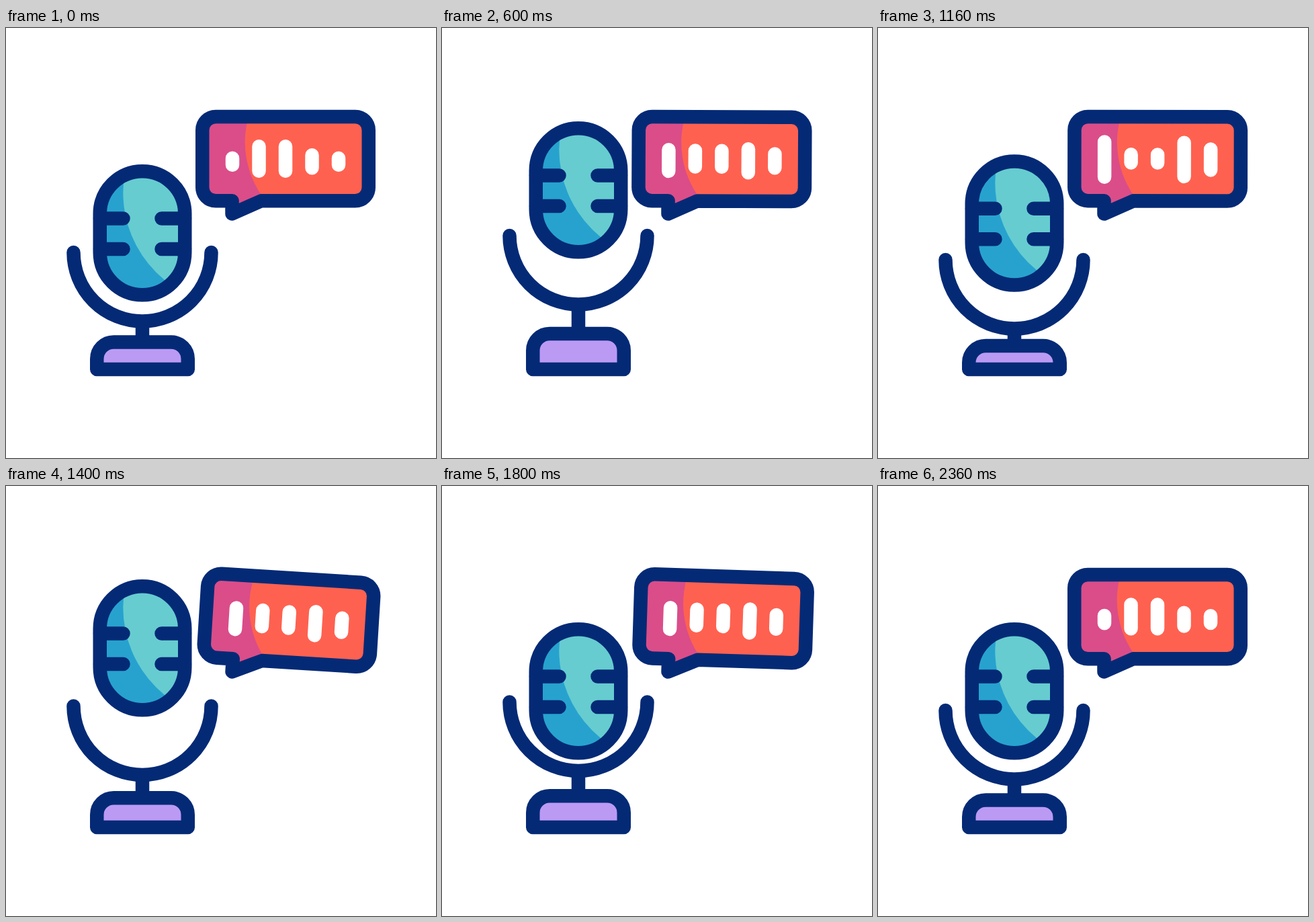
An HTML page for the animation above (2400 ms loop, 640 by 640 pixels).

```html
<!DOCTYPE html>
<html lang="en">
<head>
<meta charset="utf-8">
<title>Microphone and speech bubble</title>
<style>
  html, body { margin: 0; width: 100%; height: 100%; overflow: hidden; background: #fff; }
  svg { display: block; width: 100%; height: 100%; }
  .line, .voice { fill: none; stroke: #042a76; stroke-width: 20.5; stroke-linecap: round; stroke-linejoin: round; }
  .voice { stroke: #fff; }
</style>
</head>
<body>
<svg viewBox="0 0 640 640">
  <defs>
    <rect id="capsule" x="139.75" y="213.25" width="126.5" height="184" rx="63.25"/>
    <path id="shape" d="M312.25 132H519.75A20 20 0 0 1 539.75 152V237.25A20 20 0 0 1 519.75 257.25H380L336.5 276.5V257.25H312.25A20 20 0 0 1 292.25 237.25V152A20 20 0 0 1 312.25 132Z"/>
    <clipPath id="pill"><use href="#capsule"/></clipPath>
    <clipPath id="inside"><use href="#shape"/></clipPath>
  </defs>
  <path id="base" class="line" style="fill:#bb9af4"/>
  <path id="stem" class="line" style="stroke-linecap:butt"/>
  <path id="cradle" class="line" d="M100.5 334A102.5 102.5 0 0 0 305.5 334"/>
  <g id="head">
    <g clip-path="url(#pill)">
      <use href="#capsule" fill="#27a2ce"/>
      <circle cx="342.3" cy="245" r="168" fill="#66ccd0"/>
    </g>
    <path class="line" d="M140 283.5H174.5M140 329H174.5M266 283.5H231.5M266 329H231.5"/>
    <use href="#capsule" class="line"/>
  </g>
  <g id="bubble">
    <use href="#shape" fill="#da4d89"/>
    <g clip-path="url(#inside)">
      <path d="M363 125A140 140 0 0 0 384 254L400 270H550V125Z" fill="#ff6150"/>
    </g>
    <use href="#shape" class="line"/>
    <path id="voices" class="voice"/>
  </g>
</svg>
<script>
  const LOOP = 2400, STEP = 40, SWAY = 14.3;
  const QUIET = [30.5, 57, 57, 39.5, 30.5], LOUD = [74, 32, 32, 71.5, 52];
  const el = id => document.getElementById(id);
  const mix = (a, b, p) => a + (b - a) * p;

  // eased 0 to 1 while t runs from a to b
  function ramp(t, a, b) {
    const p = Math.min(1, Math.max(0, (t - a) / (b - a)));
    return p * p * (3 - 2 * p);
  }

  // crouch, two hops, landing
  const hop = t => 12 * ramp(t, 0, 5)
    - 76 * (ramp(t, 5, 15) - ramp(t, 15, 25) + ramp(t, 25, 35))
    + 64 * ramp(t, 35, 45);

  // the cradle catches the head a little later
  const give = t => 12 * ramp(t, 0, 5)
    - 37 * (ramp(t, 5, 15) - ramp(t, 19.5, 30) + ramp(t, 30, 40))
    + 25 * ramp(t, 40, 50);

  // four equal wobbles, then rest
  function tilt(t) {
    const u = t < 4 * SWAY ? t % SWAY : 0;
    return 5 * ramp(u, 0, 5.1) - 8.5 * ramp(u, 5.1, 10.1)
      + 4.4 * ramp(u, 10.1, 12.4) - 0.9 * ramp(u, 12.4, SWAY);
  }

  function voice(i, p) {
    const half = (mix(QUIET[i], LOUD[i], p) - 20.5) / 2;
    const y = QUIET[i] > LOUD[i] ? 194.4 : mix(198.7, 195.6, p);
    return `M${337 + 39.5 * i} ${y - half}v${2 * half}`;
  }

  function draw(t) {
    const dip = give(t), top = 467.5 + dip / 2, beat = t % 20;
    const loud = ramp(beat, 0, 10) - ramp(beat, 10, 20);
    el("head").setAttribute("transform", `translate(0 ${hop(t)})`);
    el("cradle").setAttribute("transform", `translate(0 ${dip})`);
    el("stem").setAttribute("d", `M203 ${436 + dip}V${top}`);
    el("base").setAttribute("d",
      `M135.25 508V${top + 25}a25 25 0 0 1 25 -25H245.75a25 25 0 0 1 25 25V508Z`);
    el("bubble").setAttribute("transform", `rotate(${tilt(t)} 336.5 277)`);
    el("voices").setAttribute("d", QUIET.map((_, i) => voice(i, loud)).join(""));
  }

  const begin = performance.now();
  function tick() {
    draw(Math.floor((performance.now() - begin) % LOOP / STEP));
    requestAnimationFrame(tick);
  }
  tick();
</script>
</body>
</html>
```
